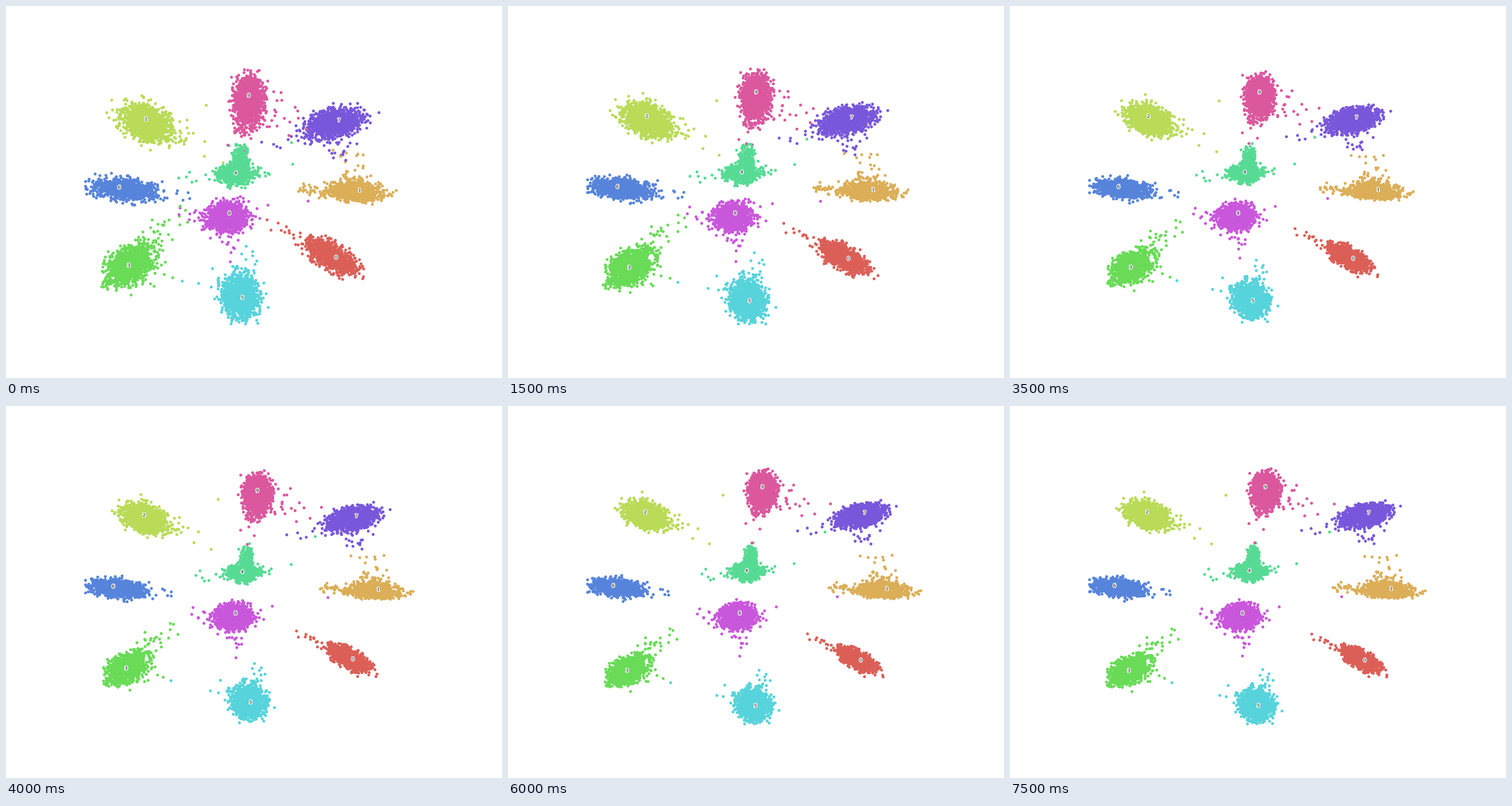
Recreate the animation shown at these times as a matplotlib script. Size 864 by 648 pixels, loop 8000 ms.

```python
import colorsys

import matplotlib.pyplot as plt
import matplotlib.patheffects as pe
import numpy as np
from matplotlib.animation import FuncAnimation

W, H, DPI = 864, 648, 72
FRAMES, INTERVAL = 16, 500
SETTLED = 10    # step at which the embedding has converged
BOX = (138.6, 100.6), (747.2, 553.8)

# Shared progress of all clusters from first to last position
KEYS = [0, 3, 5, 7, 10, 12, 15]
EASE_X = [0, 0.42, 0.28, 0.53, 0.98, 0.92, 1]
EASE_Y = [0, 0.4, 0.36, 0.38, 0.94, 1, 1]

rng = np.random.default_rng(12)
clusters = []


def color(digit):
    return colorsys.hls_to_rgb(digit / 10 + 0.01, 0.6, 0.65)


def lobe(n, x, y, a, b, angle=0, cut=2.9):
    """Trimmed Gaussian cloud, solid up to the half axes a and b."""
    r = np.sqrt(-2 * np.log(1 - rng.random(n) * (1 - np.exp(-cut**2 / 2)))) / 2.25
    phi = rng.uniform(0, 2 * np.pi, n)
    u, v = a * r * np.cos(phi), b * r * np.sin(phi)
    t = np.radians(angle)
    return np.column_stack([x + u * np.cos(t) - v * np.sin(t),
                            y + u * np.sin(t) + v * np.cos(t)])


def cluster(start, end, grow, core, *tails):
    """core: n, dx, dy, a, b, angle about the label; tails: n and mean reach."""
    n, x, y, a, b, angle = core
    parts = [lobe(*core), lobe(n // 14, x, y, 1.3 * a, 1.3 * b, angle)]
    for count, tx, ty in tails:
        reach = rng.exponential(1, count).clip(0, 4.2)
        parts.append(lobe(count, x, y, 0.9 * a, 0.9 * b, angle)
                     + reach[:, None] * (tx, ty))
    pts = np.vstack(parts)
    clusters.append(dict(start=np.array(start), end=np.array(end), pts=pts,
                         grow=np.array(grow) - 1,
                         colors=[color(len(clusters))] * len(pts)))


cluster((575, 438), (618, 443), (1.3, 1.4), (1000, -6, -1, 38, 15, 29),
        (45, -20, -9))
cluster((616, 321), (664, 318), (1.05, 1.1), (700, -7, 3, 42, 13, 3),
        (110, -4, -14), (170, -22, -1), (50, 17, 1))
cluster((244, 197), (239, 185), (1.2, 1.35), (1200, 1, 5, 40, 23, 20),
        (60, 23, 8))
cluster((214, 452), (207, 461), (1.2, 1.4), (1100, 0, 0, 36, 22, -24),
        (130, 17, -16), (45, 20, 4))
cluster((400, 291), (417, 287), (1.15, 1.08), (750, 0, 3, 27, 15, 0),
        (45, 18, -5), (40, -18, 2))
cluster((412, 508), (433, 522), (1.08, 1.4), (1200, -3, 0, 28, 27, 0),
        (130, -15, -5), (130, 3, -15))
cluster((197, 316), (182, 313), (1.25, 1.15), (1000, 6, 3, 43, 15, 6),
        (75, 24, 3))
cluster((580, 199), (625, 186), (1.18, 1.25), (1200, -7, 4, 43, 19, -13),
        (100, -20, 6), (50, 2, 15))
cluster((389, 361), (405, 361), (1.1, 1.15), (1000, -3, 5, 33, 22, 0),
        (60, -2, 13), (45, 16, -4), (45, -14, 1))
cluster((423, 156), (445, 141), (1.05, 1.35), (1100, -1, 6, 25, 33, 3),
        (180, -4, 13), (75, 19, 5))

# The spire rising from class 4
spire = lobe(250, 7, -20, 12, 23, 5)
clusters[4]["pts"] = np.vstack([clusters[4]["pts"], spire])
clusters[4]["colors"] += [color(4)] * len(spire)

# Misplaced points lie a third of the way from a host to their own class
for host, digit in [(7, 4), (7, 9), (1, 8), (3, 5), (4, 9), (9, 2)]:
    c = clusters[host]
    gap = (clusters[digit]["end"] - c["end"]) / 3
    c["pts"] = np.vstack([c["pts"], gap])
    c["colors"].append(color(digit))

colors = np.vstack([c["colors"] for c in clusters])
order = rng.permutation(len(colors))
drift = rng.normal(0, 3, (len(colors), 2))

fig = plt.figure(figsize=(W / DPI, H / DPI), dpi=DPI, facecolor="white")
ax = fig.add_axes([0, 0, 1, 1])
ax.set(xlim=(0, W), ylim=(H, 0))
ax.axis("off")
dots = ax.scatter(np.zeros(len(colors)), np.zeros(len(colors)), s=26,
                  c=colors[order], linewidths=0)
labels = [ax.text(0, 0, str(d), family="DejaVu Sans", fontsize=8, color="black",
                  ha="center", va="center", zorder=5,
                  path_effects=[pe.Stroke(linewidth=3, foreground="white"),
                                pe.Normal()])
          for d in range(10)]


def update(i):
    fade = max(0, 1 - i / SETTLED)
    ease = np.array([np.interp(i, KEYS, EASE_X), np.interp(i, KEYS, EASE_Y)])
    placed = []
    for c, label in zip(clusters, labels):
        pos = c["start"] + (c["end"] - c["start"]) * ease
        label.set_position(pos)
        placed.append(pos + c["pts"] * (1 + c["grow"] * fade))
    noise = np.random.default_rng([5, i]).normal(0, 1, drift.shape)
    xy = np.vstack(placed) + drift * fade + noise * (0.35 + 1.8 * fade)
    dots.set_offsets(np.clip(xy, *BOX)[order])
    return [dots, *labels]


anim = FuncAnimation(fig, update, frames=FRAMES, interval=INTERVAL,
                     repeat=True, repeat_delay=0, blit=False)
plt.show()
```
